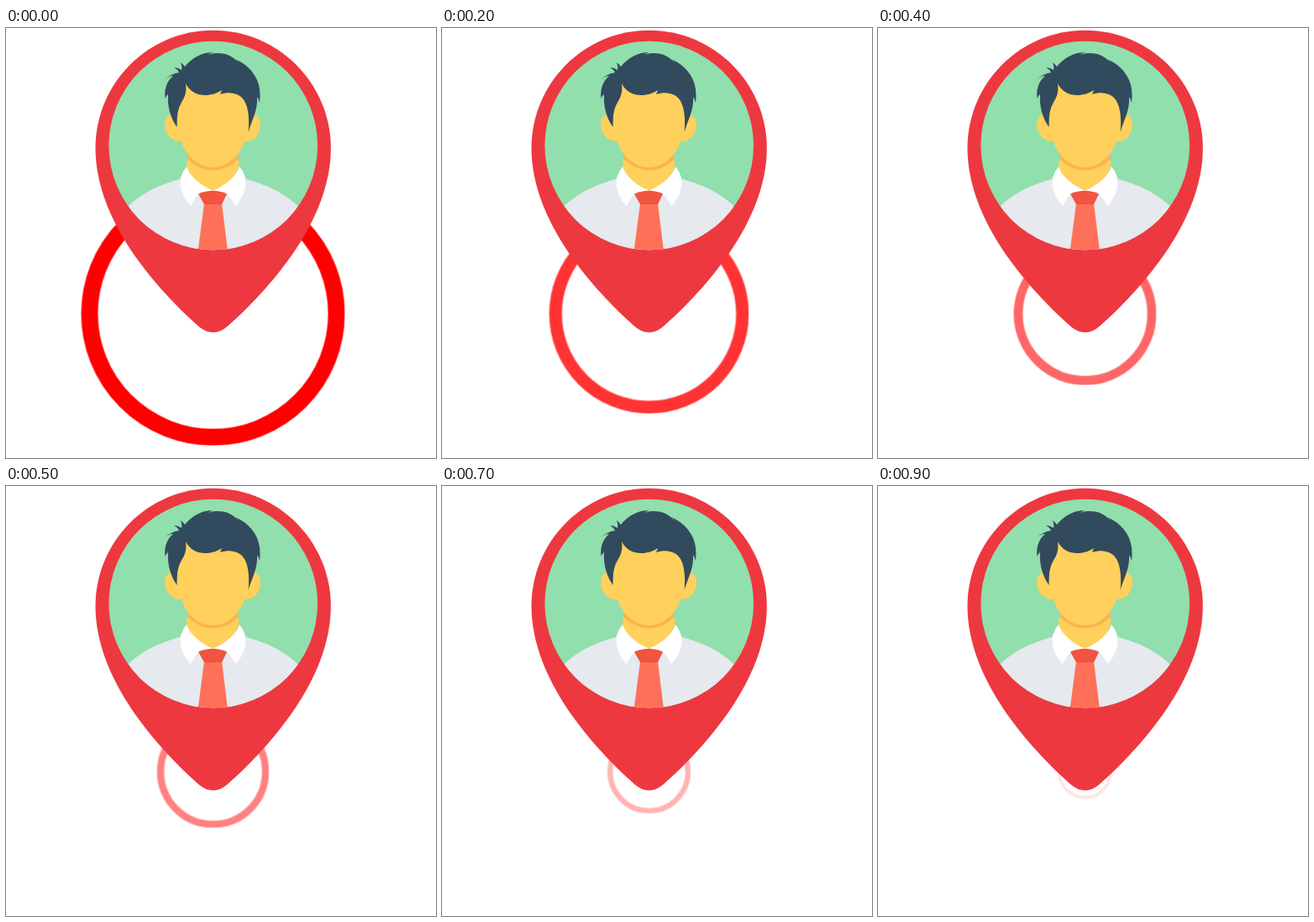
Write an HTML page that moves like this. It is 512 px wide and 512 px high and loops after 1 s.

```html
<!DOCTYPE html>
<html lang="en">
<head>
<meta charset="utf-8">
<title>Location pin</title>
<style>
  html, body { margin: 0; width: 100%; height: 100%; overflow: hidden; background: #fff; }
  svg { display: block; width: 100%; height: 100%; }
  .pulse { animation: shrink 1s step-end infinite; }
  /* the ring shrinks and fades in ten held steps */
  @keyframes shrink {
    0%   { transform: scale(1);    opacity: 1; }
    10%  { transform: scale(.866); opacity: .9; }
    20%  { transform: scale(.757); opacity: .8; }
    30%  { transform: scale(.661); opacity: .7; }
    40%  { transform: scale(.541); opacity: .6; }
    50%  { transform: scale(.425); opacity: .5; }
    60%  { transform: scale(.367); opacity: .4; }
    70%  { transform: scale(.316); opacity: .3; }
    80%  { transform: scale(.262); opacity: .2; }
    90%, 100% { transform: scale(.208); opacity: .1; }
  }
</style>
</head>
<body>
<svg viewBox="0 0 512 512">
  <defs>
    <clipPath id="box"><path d="M-156.5-156.5h313v313h-313z"/></clipPath>
    <clipPath id="disc"><circle cx="246.7" cy="140" r="124.3"/></clipPath>
    <path id="collar" d="M215 165C219 177 231 187 246.5 193.500L232 195.500Q225 201 220 212C211 203 206 191 208 178Q210 171 215 165Z"/>
  </defs>

  <g transform="translate(246.5 340.2)">
    <g class="pulse">
      <circle r="147" fill="none" stroke="#f00" stroke-width="20" clip-path="url(#box)"/>
    </g>
  </g>

  <path fill="#ee3840" d="M246.6 2.700C169 2.700 106.500 66 106.500 143C106.500 231 181 312 229 355Q246.600 370 264 355C312 312 386.800 231 386.800 143C386.800 66 324 2.700 246.600 2.700Z"/>

  <g clip-path="url(#disc)">
    <path fill="#91dfac" d="M120 14h254v254h-254z"/>
    <path fill="#e6e9ee" d="M140 218C160 195 186 186 210 179H283C307 186 333 195 353 218V270H140Z"/>
    <path fill="#ffd05b" d="M216 153H277V166Q268 187 246.500 196Q224 187 215 166Z"/>
    <path fill="#f9b54c" d="M216 153H277V156Q263 169.500 246.500 169.500Q230 169.500 216 156Z"/>
    <use href="#collar" fill="#fff"/>
    <use href="#collar" fill="#fff" transform="matrix(-1 0 0 1 493 0)"/>
    <path fill="#ff7058" d="M236 209H257L264 266H228.500Z"/>
    <path fill="#f1543f" d="M229 197.500Q246.500 190 263 197.500L257 210H236Z"/>
    <path fill="#ffd05b" d="M203 102C194 101 188 107 189 116C190 127 198 136 209 135C213 151 229 166 246.500 166C264 166 279 151 284 135C295 136 302 127 303 116C304 107 298 101 290 102L286 72L214 60Z"/>
    <path fill="#324a5e" d="M203.500 118C196 107 192 94 193 79Q190 81 189.500 84C188 72 192 63 199 57Q194 57 189 62Q195 55 206 53Q204 49 200 47Q205 47 209 50Q210 46 208 41Q211 43 213 46C222 35 233 29 247 29Q243 30 240 32C256 27 270 32 277 42Q276 39 273 37C289 44 300 57 302 73Q303 81 302 89Q301 85 299 82C300 98 293 109 288.500 124C290 110 289 96 284 87C279 78 267 75 255 79L257 74C244 83 222 83 214 66C216 81 210 85 206 95C203 104 204 110 203.500 118Z"/>
  </g>
</svg>
</body>
</html>
```
